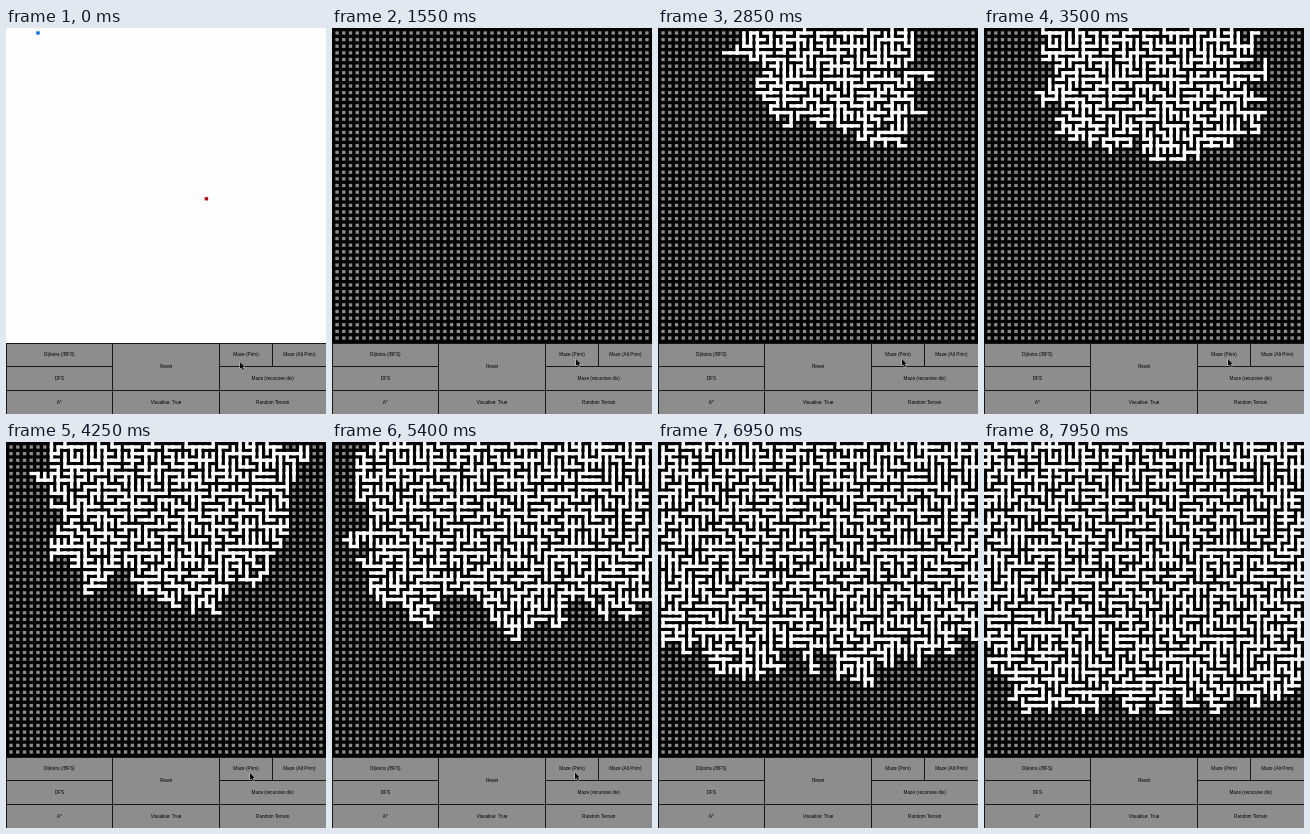
An HTML page with a canvas that plays this animation: 320x386 px, repeating every 8 s.

```html
<!DOCTYPE html>
<html lang="en">
<head>
<meta charset="utf-8">
<title>Maze generation</title>
<style>
html, body { margin: 0; width: 100%; height: 100%; overflow: hidden; background: #fff; }
canvas { display: block; }
</style>
</head>
<body>
<canvas id="stage" width="320" height="386"></canvas>
<script>
const ctx = document.getElementById('stage').getContext('2d');
const LOOP = 8000, STEP = 50, START = 1550;
const W = 320, H = 386, GRID_H = 315, CELLS = 95, ROOMS = 47;
const CW = W / CELLS, CH = GRID_H / CELLS;
const GREY = '#8d8d8d';
const RATE = 0.288; // rooms carved per millisecond

let seed = 4711;
function rand() {
  seed = (seed + 0x6D2B79F5) | 0;
  let v = Math.imul(seed ^ (seed >>> 15), seed | 1);
  v ^= v + Math.imul(v ^ (v >>> 7), v | 61);
  return ((v ^ (v >>> 14)) >>> 0) / 4294967296;
}

const lerp = (a, b, k) => a + (b - a) * k;
const DIRS = [[1, 0], [-1, 0], [0, 1], [0, -1]];
const inside = (c, r) => c >= 0 && r >= 0 && c < ROOMS && r < ROOMS;

// Rounded-square distance from the first room, with a gentle wave in the front.
function reach(c, r) {
  const x = (c * 2 + 1.5) * CW, y = (r * 2 + 1.5) * CH;
  const dx = Math.abs(x - 178), dy = Math.abs(y - 28) * 1.1;
  const d = (dx ** 3.5 + dy ** 3.5) ** (1 / 3.5);
  return d - 9 * Math.min(1, d / 100) * Math.cos((x - 65) / 130 * 2 * Math.PI);
}

// Prim's algorithm: always open the cheapest wall between a carved and a closed room.
function growMaze() {
  const passages = [], done = new Set(), walls = [];
  const id = (c, r) => r * ROOMS + c;
  const now = () => START + done.size / RATE;

  function carve(time, c, r, dx, dy) {
    passages.push({
      time,
      x: c * 2 + 1 + Math.min(0, dx), y: r * 2 + 1 + Math.min(0, dy),
      w: 1 + Math.abs(dx), h: 1 + Math.abs(dy)
    });
  }

  function visit(c, r) {
    done.add(id(c, r));
    for (const [dx, dy] of DIRS) {
      const nc = c + dx, nr = r + dy;
      if (!inside(nc, nr)) {
        if (rand() < 0.5) carve(now() + rand() * 1600, c, r, dx, dy);
      } else if (!done.has(id(nc, nr))) {
        walls.push({ c: nc, r: nr, dx, dy, cost: reach(nc, nr) + rand() * 75 });
      }
    }
  }

  visit(26, 4);
  while (walls.length && now() < LOOP) {
    let best = 0;
    walls.forEach((wall, i) => { if (wall.cost < walls[best].cost) best = i; });
    const { c, r, dx, dy } = walls.splice(best, 1)[0];
    if (done.has(id(c, r))) continue;
    carve(now(), c, r, -2 * dx, -2 * dy);
    visit(c, r);
  }
  return passages;
}

const maze = growMaze();

function cells(color, x, y, w = 1, h = 1) {
  ctx.fillStyle = color;
  ctx.fillRect(x * CW, y * CH, w * CW, h * CH);
}

function drawGrid(t) {
  if (t < START) {
    cells('#0070f8', 9, 1);
    cells('#c4000c', 59, 51);
    return;
  }
  ctx.fillStyle = '#000';
  ctx.fillRect(0, 0, W, GRID_H);
  for (let r = 1; r < CELLS; r += 2)
    for (let c = 1; c < CELLS; c += 2) cells(GREY, c, r);
  for (const p of maze)
    if (p.time <= t) cells('#fff', p.x, p.y, p.w, p.h);
}

const ROW = (H - GRID_H) / 3, COL = W / 3;
// label, column, row, columns, rows
const buttons = [
  ['Dijkstra (/BFS)', 0, 0, 1, 1],
  ['DFS', 0, 1, 1, 1],
  ['A*', 0, 2, 1, 1],
  ['Reset', 1, 0, 1, 2],
  ['Visualise: True', 1, 2, 1, 1],
  ['Maze (Prim)', 2, 0, 0.5, 1],
  ['Maze (Alt Prim)', 2.5, 0, 0.5, 1],
  ['Maze (recursive div)', 2, 1, 1, 1],
  ['Random Terrain', 2, 2, 1, 1]
];

function drawButtons() {
  ctx.font = '4.7px "Liberation Sans", Arial, sans-serif';
  ctx.textAlign = 'center';
  ctx.textBaseline = 'middle';
  ctx.fillStyle = GREY;
  ctx.fillRect(0, GRID_H, W, H - GRID_H);
  ctx.strokeStyle = '#181818';
  ctx.lineWidth = 1;
  ctx.fillStyle = '#000';
  const snap = v => Math.floor(v) + 0.5;
  for (const [label, c, r, w, h] of buttons) {
    const x = c * COL, y = GRID_H + r * ROW;
    const left = snap(x), top = snap(y);
    ctx.strokeRect(left, top, snap(x + w * COL) - left, snap(y + h * ROW) - top);
    ctx.fillText(label, x + w * COL / 2, y + h * ROW / 2 + 0.2);
  }
}

// time, x, y of the pointer tip
const path = [
  [0, 234, 334], [500, 234, 334], [950, 244, 331], [4950, 244, 331],
  [5400, 243, 330.5], [6300, 243, 331], [6600, 245, 350], [6800, 248, 374]
];

function drawCursor(t) {
  if (t > 6800) return;
  let i = 1;
  while (path[i][0] < t) i++;
  const [t0, x0, y0] = path[i - 1], [t1, x1, y1] = path[i];
  const k = (t - t0) / (t1 - t0);
  ctx.save();
  ctx.translate(lerp(x0, x1, k), lerp(y0, y1, k));
  ctx.beginPath();
  ctx.moveTo(0, 0);
  for (const [x, y] of [[0, 6.8], [1.6, 5.4], [2.7, 8], [3.9, 7.5], [2.8, 5], [4.9, 4.9]])
    ctx.lineTo(x, y);
  ctx.closePath();
  ctx.strokeStyle = '#ddd';
  ctx.lineWidth = 0.9;
  ctx.stroke();
  ctx.fillStyle = '#000';
  ctx.fill();
  ctx.restore();
}

const origin = performance.now();
function frame() {
  const t = Math.floor(((performance.now() - origin) % LOOP) / STEP) * STEP;
  ctx.fillStyle = '#fefefe';
  ctx.fillRect(0, 0, W, H);
  drawGrid(t);
  drawButtons();
  drawCursor(t);
  requestAnimationFrame(frame);
}
frame();
</script>
</body>
</html>
```
